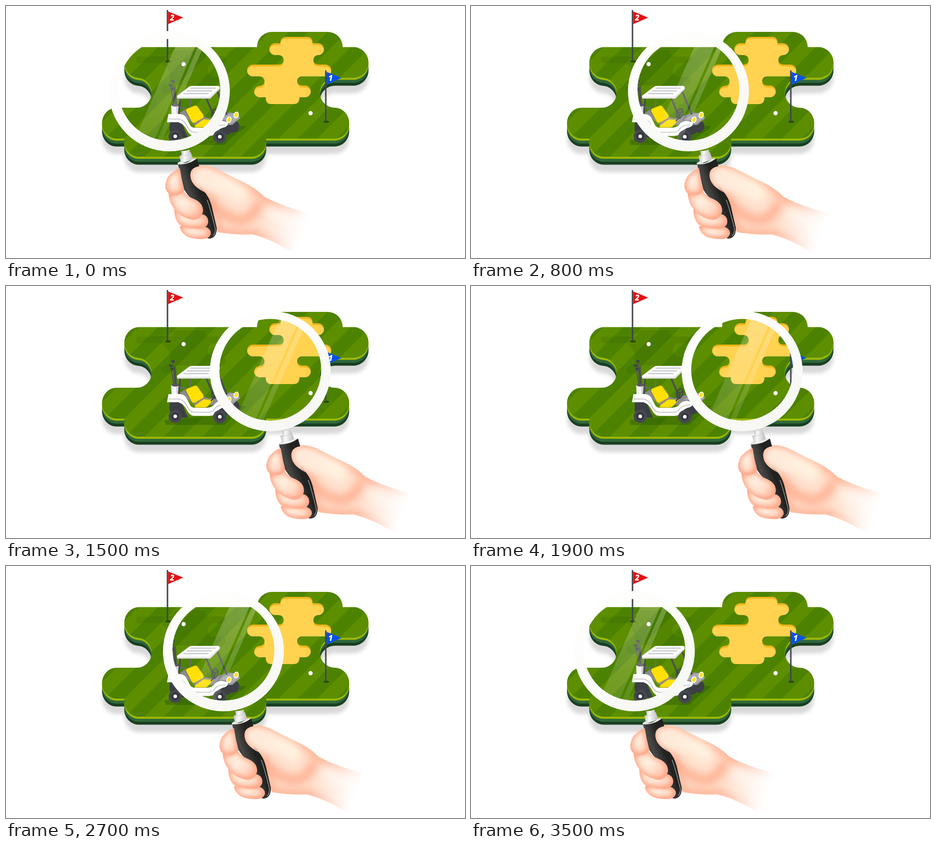
Recreate the animation shown at these times as an HTML page. Size 1009x555 px, loop 3.6 s.

```html
<!DOCTYPE html>
<html lang="en">
<head>
<meta charset="utf-8">
<title>Golf course under a magnifier</title>
<style>
  html, body { margin: 0; width: 100%; height: 100%; overflow: hidden; background: #fff; }
  svg { display: block; width: 100%; height: 100%; }
  text { font: italic 800 17px "Open Sans", "Noto Sans", sans-serif; fill: #fff; }
</style>
</head>
<body>
<svg viewBox="0 0 1009 555" fill="none">
  <defs>
    <path id="land" d="M291 90.500H552V89A33 32 0 0 1 585 57H707A33 33 0 0 1 740 90.500H767A34 34 0 0 1 767 158H723A33 33 0 0 0 723 224A32 34 0 0 1 722 292H572V299A32 33 0 0 1 540 332H292A32 33 0 0 1 260 299V292H243A32 34 0 0 1 243 224H288A32 33 0 0 0 288 158A33 34 0 0 1 291 90.500Z"/>
    <path id="sand" d="M617 68H662Q674 68 674 82H686A13 13 0 0 1 686 108A10.500 10.500 0 0 0 686 129H702A13 13 0 0 1 702 155H650A10 10 0 0 0 650 175H657A13 13 0 0 1 657 201H645Q645 216 632 216H583Q571 216 571 201H558A12.500 12.500 0 0 1 558 176A10.500 10.500 0 0 0 558 155H543A13 13 0 0 1 543 129H600A10.500 10.500 0 0 0 600 108H592A13 13 0 0 1 592 82H603Q603 68 617 68Z"/>
    <pattern id="stripes" width="60" height="60" patternUnits="userSpaceOnUse" patternTransform="rotate(45)">
      <path fill="#5d8e00" d="M0 0H60V60H0Z"/>
      <path fill="#4d8200" d="M0 0H30V60H0Z"/>
    </pattern>
    <clipPath id="sandClip"><use href="#sand"/></clipPath>
    <clipPath id="glass"><circle cx="359" cy="184.500" r="112"/></clipPath>
    <filter id="shadow" x="-10%" y="-10%" width="120%" height="130%"><feGaussianBlur stdDeviation="4"/></filter>
    <filter id="soft" x="-30%" y="-30%" width="160%" height="160%"><feGaussianBlur stdDeviation="5"/></filter>
    <filter id="softer" x="-60%" y="-60%" width="220%" height="220%"><feGaussianBlur stdDeviation="10"/></filter>
    <linearGradient id="rim" x1="0" y1="0" x2=".6" y2="1">
      <stop stop-color="#fff"/><stop offset=".5" stop-color="#fcfcfa"/><stop offset="1" stop-color="#f7f7f4"/>
    </linearGradient>
    <linearGradient id="steel">
      <stop stop-color="#c2c2c2"/><stop offset=".35" stop-color="#fafafa"/><stop offset="1" stop-color="#b9b9b9"/>
    </linearGradient>
    <linearGradient id="grip" gradientUnits="userSpaceOnUse" x1="392" y1="440" x2="432" y2="425">
      <stop stop-color="#262625"/><stop offset=".45" stop-color="#484846"/><stop offset="1" stop-color="#222221"/>
    </linearGradient>
    <linearGradient id="glare" x1=".7" y1="0" x2=".3" y2="1">
      <stop stop-color="#fff" stop-opacity=".26"/><stop offset="1" stop-color="#fff" stop-opacity=".12"/>
    </linearGradient>
    <radialGradient id="flesh" cx=".42" cy=".42" r=".62">
      <stop stop-color="#ffefe0"/><stop offset=".55" stop-color="#ffdcc8"/><stop offset="1" stop-color="#ffb99c"/>
    </radialGradient>
    <linearGradient id="fade" gradientUnits="userSpaceOnUse" x1="560" y1="470" x2="649" y2="505">
      <stop stop-color="#fff"/><stop offset="1" stop-color="#fff" stop-opacity="0"/>
    </linearGradient>
    <linearGradient id="thumbFade" gradientUnits="userSpaceOnUse" x1="428" y1="385" x2="485" y2="405">
      <stop stop-color="#fff"/><stop offset="1" stop-color="#fff" stop-opacity="0"/>
    </linearGradient>
    <mask id="armMask" maskUnits="userSpaceOnUse" x="330" y="320" width="420" height="260">
      <path fill="url(#fade)" d="M330 320H750V580H330Z"/>
    </mask>
    <mask id="thumbMask" maskUnits="userSpaceOnUse" x="330" y="320" width="420" height="260">
      <path fill="url(#thumbFade)" d="M330 320H750V580H330Z"/>
    </mask>
  </defs>

  <!-- Course -->
  <use href="#land" y="34" fill="#000" opacity=".15" filter="url(#shadow)"/>
  <g id="sides"></g>
  <use href="#land" fill="url(#stripes)"/>
  <path fill="#174b00" opacity=".13" d="M293 111H358Q368 111 368 104T378 97H428Q438 97 438 104T448 111H476A7.500 7.500 0 0 1 476 126H458A15 15 0 0 0 458 156H474A9 9 0 0 1 474 175H378Q368 175 368 184T358 193H350A9 9 0 0 1 350 175Q360 172 360 156T342 126H293A7.500 7.500 0 0 1 293 111Z"/>
  <use href="#sand" fill="#efb515"/>
  <g clip-path="url(#sandClip)"><use href="#sand" y="4" fill="#ffd250"/></g>
  <g fill="#fff"><circle cx="390.500" cy="128" r="4.700"/><circle cx="669.500" cy="236" r="4.700"/></g>

  <g id="flags"></g>

  <!-- Cart -->
  <g stroke-linecap="round" stroke-linejoin="round">
    <path fill="#1d4a00" opacity=".35" d="M348 295L351 306H480L498 288L526 268V264H500L470 285Z"/>
    <g fill="#3c3f45">
      <path d="M361 256H386L400 290H372Q355 280 361 256ZM455 270L490 254L495 280L465 292Z"/>
      <ellipse cx="499" cy="265" rx="14" ry="14"/>
    </g>
    <path stroke="#4b4e54" stroke-width="2" d="M371 218L367 167M373 218L370 180M369 218L362 176M375 218L372 178"/>
    <path stroke="#3f4248" stroke-width="5" d="M365.500 165.500L368.500 166M360.500 174.500L363.500 176M364 182L366 183"/>
    <path fill="#f4f4f4" d="M363 218H380V240H364Z"/>
    <path fill="#d2d2d2" d="M374 219H380V240H375Z"/>
    <ellipse cx="372" cy="218" rx="8.500" ry="3.500" fill="#55585d"/>
    <path fill="#8b8d90" d="M382 236L396 226L410 236L448 248L466 242L492 234L510 238L513 248L498 262H415L400 250Z"/>
    <path stroke="#4a4d52" stroke-width="4" d="M383 203L380 238M440 203L459 247M463 185L485 238"/>
    <path stroke="#696c70" stroke-width="3" d="M406 204L405 221M394 225L384 224"/>
    <path fill="#6c6e72" d="M393 230L397 226L415 258L408 256Z"/>
    <path fill="#ffe000" stroke="#e4bd00" d="M396 231Q395 228 399 226L414 220Q418 218 421 222L433 239Q436 244 432 247L416 256Q411 259 408 254Z"/>
    <path fill="#ffe000" stroke="#e4bd00" d="M415 264L432 251Q435 249 440 250L456 251L443 265Q441 267 437 267H416Z"/>
    <g stroke="#414449" stroke-width="2.700">
      <ellipse cx="459" cy="237" rx="6.500" ry="10.500" transform="rotate(22 459 237)"/>
      <path d="M454 235L465 233M460 237L457 246L451 253"/>
    </g>
    <path fill="#fff" d="M357 238H383Q394 239 399 251L405 263Q408 268 415 268H443Q452 268 458 261Q464 253 475 253L487 256Q490 263 481 267Q469 269 462 279Q457 286 447 286H414Q405 286 400 277Q392 260 379 256H354Z"/>
    <path stroke="#c5c7c8" stroke-width="2" d="M358 249H379Q390 250 397 263Q404 278 414 278H447Q456 276 461 268Q467 262 481 262"/>
    <path fill="#a9abad" d="M467 251L490 237L510 235L514 247L493 261Q487 248 467 251Z"/>
    <g fill="#ffe100" stroke="#fff" stroke-width="2">
      <ellipse cx="490" cy="250.500" rx="4.500" ry="6.500" transform="rotate(18 490 250.500)"/>
      <ellipse cx="506" cy="240" rx="4.500" ry="6.500" transform="rotate(18 506 240)"/>
    </g>
    <g id="wheels"></g>
    <path fill="#e3e4e5" d="M376 197L447 197L470 178V183L449 204H378Q375 203 376 197Z"/>
    <path fill="#fff" d="M377 197L402 178Q405 176 409 176H466Q472 177 468 181L449 198Q447 200 443 200H379Q374 200 377 197Z"/>
    <path stroke="#cbcdd0" stroke-width="3" d="M407 181H460M399 187H452M391 193H444"/>
  </g>

  <!-- Magnifier and hand -->
  <g id="magnifier">
    <g clip-path="url(#glass)" fill="url(#glare)">
      <path d="M385 60H429L324 300H280Z"/>
      <path d="M435 60H447L342 300H330Z"/>
    </g>
    <path fill="url(#rim)" fill-rule="evenodd" d="M226 187.500a133 132.500 0 1 1 266 0a133 132.500 0 1 1-266 0ZM247 184.500a112 112 0 1 0 224 0a112 112 0 1 0-224 0Z"/>
    <path fill="url(#steel)" d="M385 319Q395 320 403 316L407 329L387 333Z"/>
    <path fill="url(#steel)" d="M381 330L406 322L412 338L385 347Z"/>
    <path stroke="#aaa" stroke-opacity=".6" d="M382 331Q396 331 407 323"/>
    <g id="palm" mask="url(#armMask)"></g>
    <path fill="url(#grip)" d="M378 348Q402 349 420 336L425 354L416 382L437 410Q447 422 452 440L463 488Q464 508 450 512Q442 514 438 505L426 440Q404 425 392 405Q385 379 378 348Z"/>
    <path fill="#e8e8e6" d="M377 346Q380 343 385 342L386 346Q402 346 411 336L420 335Q405 349 378 349Z"/>
    <path stroke="#9b9b98" stroke-width="1.500" d="M442 427Q449 445 460 490Q461 501 455 506"/>
    <g id="fingers"></g>
    <g id="thumb" mask="url(#thumbMask)"></g>
  </g>
</svg>
<script>
const byId = id => document.getElementById(id);
const add = (id, markup) => byId(id).insertAdjacentHTML('beforeend', markup);

[[17.5, '#193f22'], [11, '#31683a'], [4.5, '#9bb900']].forEach(([y, color]) =>
  add('sides', `<use href="#land" y="${y}" fill="${color}"/>`));

const flag = (x, y, color, digit) => add('flags', `<g transform="translate(${x} ${y})">
  <ellipse cx="1" cy="114" rx="6.500" ry="2.500" fill="#264b09"/>
  <path stroke="#3e454c" stroke-width="3.200" stroke-linecap="round" d="M0 2V113"/>
  <path fill="${color}" d="M1.500 4L34.500 17.500L1.500 32Z"/>
  <text x="5.500" y="23.500">${digit}</text></g>`);
flag(355, 8, '#e90f12', 2);
flag(703, 141, '#0750e8', 1);

[[372, 287], [470, 288]].forEach(([x, y]) => add('wheels', `
  <circle cx="${x}" cy="${y}" r="14.500" fill="#45484f"/>
  <circle cx="${x}" cy="${y}" r="8.500" fill="#33363c"/>
  <circle cx="${x}" cy="${y}" r="4" fill="#fff"/>`));

// A rounded skin form: shaded fill with a blurred rim kept inside its outline.
let skinCount = 0;
function skin(parent, d, { fill = 'url(#flesh)', edge = '#ff9f80', width = 7, filter = 'soft', extra = '' } = {}) {
  const clip = 'skin' + skinCount++;
  add(parent, `<clipPath id="${clip}"><path d="${d}"/></clipPath><g clip-path="url(#${clip})">
    <path d="${d}" fill="${fill}"/>
    <path d="${d}" stroke="${edge}" stroke-width="${width}" filter="url(#${filter})"/>${extra}</g>`);
}

skin('palm', 'M416 352Q440 346 470 362L507 381Q546 397 568 420Q605 440 668 457L760 470L720 590L632 544Q585 514 542 503Q505 505 465 498L440 425L405 380Z', {
  fill: '#ffdfcc', edge: '#ffa786', width: 16, filter: 'softer',
  extra: `<g filter="url(#softer)">
    <path stroke="#ff9872" stroke-opacity=".8" stroke-width="16" d="M440 418Q466 464 515 472Q546 468 558 430"/>
    <path stroke="#fff3e0" stroke-width="36" stroke-linecap="round" d="M450 382Q480 388 512 412"/>
    <path stroke="#fff0e2" stroke-width="24" d="M575 455L660 490"/></g>`
});

[
  'M382 486Q384 482 397 484L440 487Q452 492 450 503Q445 514 430 513.5Q404 513 394 505Q384 498 382 486Z',
  'M370 446Q380 447 400 458L434 459Q447 465 444 479Q439 491 424 491Q398 490 382 482Q369 469 370 446Z',
  'M357 411Q374 419 389 404Q396 418 411 424Q434 433 433 452Q430 470 412 471Q388 468 371 449Q358 433 357 411Z',
  'M382 357Q386 382 392 405Q385 417 370 417Q350 415 350 394Q353 375 364 368Q370 361 382 357Z'
].forEach(d => skin('fingers', d));

skin('thumb', 'M406 379Q402 359 420 354Q440 347 470 362L512 388L500 440L440 412Q410 398 406 379Z',
  { fill: '#ffe9d9', edge: '#ffb394', width: 8 });

// Seventeen equal steps to the right, a hold, then the same way back.
const count = 36, stepWidth = 14.83;
const poses = Array.from({ length: count + 1 }, (_, i) => {
  const step = i % count;
  const x = Math.round(stepWidth * Math.min(step, count - 1 - step));
  return { transform: `translateX(${x}px)`, offset: i / count, easing: 'steps(1, end)' };
});
byId('magnifier').animate(poses, { duration: 3600, iterations: Infinity });
</script>
</body>
</html>
```
